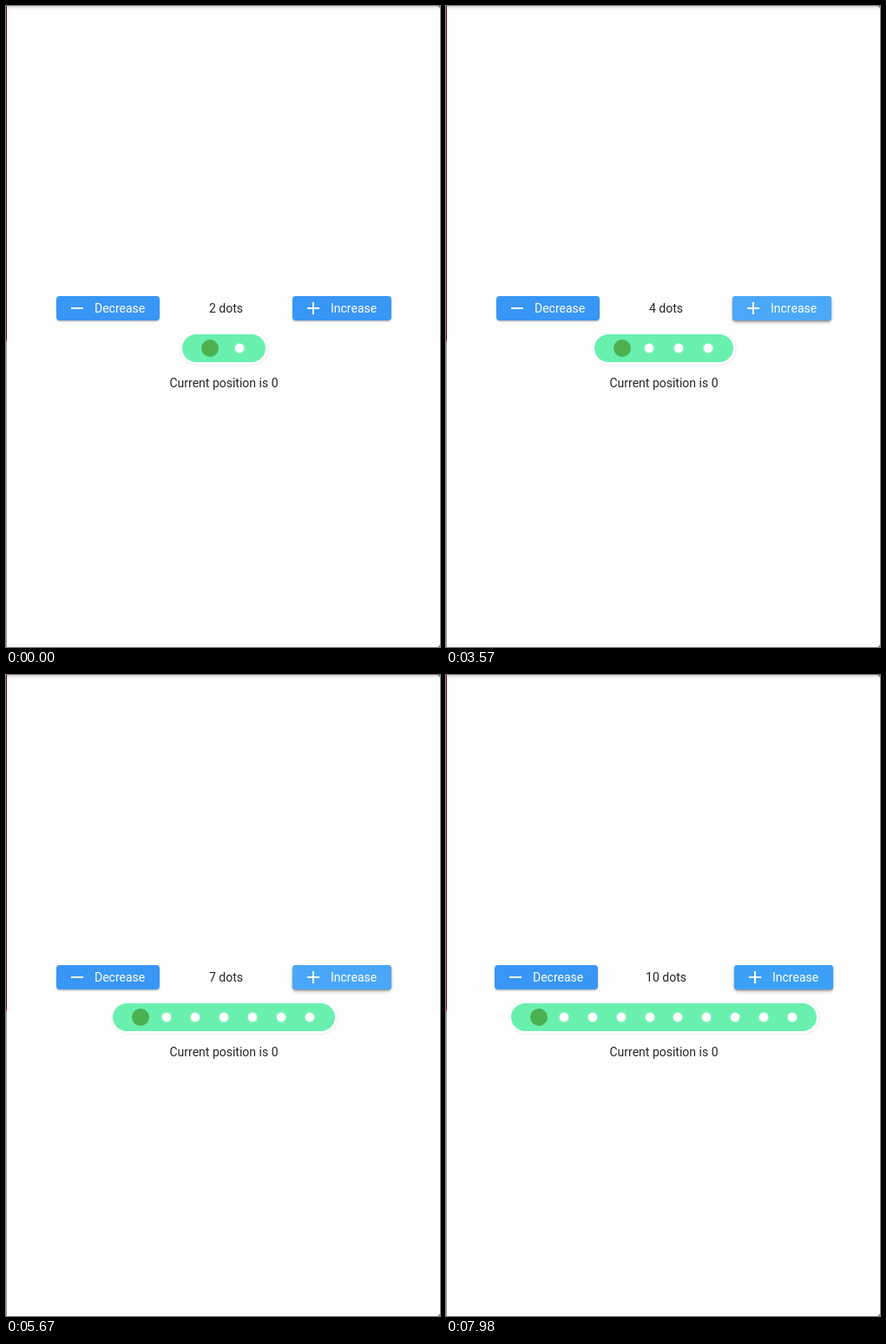
These frames come from a looping animation (500x738 px, 8000 ms). An HTML page:

```html
<!DOCTYPE html>
<html lang="en">
<head>
<meta charset="utf-8">
<title>Dots indicator</title>
<style>
  html, body { margin: 0; width: 100%; height: 100%; overflow: hidden; background: #fefefe; }
  body { position: relative; font: 14px/28px Roboto, sans-serif; color: #262626; }
  div, span, svg { position: absolute; white-space: nowrap; }
  .top { inset: 0 0 auto; height: 5px; background: linear-gradient(#d2d2d2, #efefef 45%, #fefefe); }
  .edge { left: 0; top: 0; width: 1px; height: 100%;
    background: linear-gradient(#66002f 385px, #d8402c 385px 387px, #999 387px); }
  .corner { width: 3px; height: 3px; right: 0; }
  .button { top: 334px; height: 28px; border-radius: 4px; background: #3896f5; color: #fff;
    box-shadow: 0 2px 2px -1px rgba(0,0,0,.2), 0 1px 3px rgba(0,0,0,.16); }
  .button span { left: 44px; }
  .button svg { left: 17px; top: 7px; stroke: #fff; stroke-width: 2; }
  #decrease { width: 119px; }
  #increase { width: 114px; }
  .layer { inset: 0; border-radius: 4px; overflow: hidden; }
  #hover { background: #3ca0f7; box-shadow: 0 2px 3px rgba(0,0,0,.12), 0 3px 4px rgba(0,0,0,.12); }
  #ripple { border-radius: 50%; background: #fff; transform: translate(-50%, -50%); }
  .line { text-align: center; height: 28px; }
  #count { left: 203.5px; top: 334px; width: 100px; }
  #position { left: 151px; top: 420px; width: 200px; }
  #pill { top: 378px; height: 32px; border-radius: 16px; background: #69f0ae;
    box-shadow: 0 0 0 2.5px #fff, 1px 1px 2px 3px rgba(0,0,0,.055); }
  .dot { top: 16px; width: 10px; height: 10px; border-radius: 50%; background: #fff;
    transform: translate(-50%, -50%); box-shadow: 0 0 1.5px .5px rgba(235,250,243,.85); }
  .dot.active { width: 20px; height: 20px; background: #4caf50; box-shadow: none; }
</style>
</head>
<body>
<div class="top"></div>
<div class="edge"></div>
<div class="corner" style="top:0; background:radial-gradient(circle at 0 100%, transparent 2.4px, #666 3.2px)"></div>
<div class="corner" style="bottom:0; background:radial-gradient(circle at 0 0, transparent 2.4px, #666 3.2px)"></div>

<div class="button" id="decrease">
  <svg width="14" height="14"><path d="M0 7H14"/></svg>
  <span>Decrease</span>
</div>
<div class="line" id="count"></div>
<div class="button" id="increase">
  <div class="layer" id="hover"></div>
  <div class="layer"><div id="ripple"></div></div>
  <svg width="14" height="14"><path d="M0 7H14M7 0V14"/></svg>
  <span>Increase</span>
</div>
<div id="pill"></div>
<div class="line" id="position">Current position is 0</div>

<script>
const LOOP = 8000;
const HOVER_START = 2130, HOVER_TIME = 200;
// Times of pointer down and pointer up; each release adds one dot.
const TAPS = [
  [2355, 2445], [3060, 3268], [3900, 4010], [4590, 4705],
  [5265, 5363], [6000, 6110], [6690, 6805], [7495, 7570]
];
const SPREAD_TIME = 225, FADE_TIME = 150;
const RADIUS_FROM = 17.6, RADIUS_TO = 63.7;
const POINTER_X = 48, CENTRE_X = 57;

const el = id => document.getElementById(id);
const clamp = v => Math.min(1, Math.max(0, v));
const mix = (a, b, k) => a + (b - a) * k;

// cubic-bezier(.25, .1, .25, 1)
function ease(x) {
  const bezier = (s, a, b) => 3 * (1 - s) ** 2 * s * a + 3 * (1 - s) * s * s * b + s ** 3;
  let low = 0, high = 1;
  for (let i = 0; i < 20; i++) {
    const mid = (low + high) / 2;
    if (bezier(mid, .25, .25) < x) low = mid; else high = mid;
  }
  return bezier(low, .1, 1);
}

let shown = 0;
function showDots(n) {
  if (n === shown) return;
  shown = n;
  const width = 32 * n + 32, pitch = 32 + 8 / n, lastInset = 28 + 4 / n;
  const pill = el('pill');
  pill.style.width = width + 'px';
  pill.style.left = 251 - width / 2 + 'px';
  pill.innerHTML = Array.from({ length: n }, (_, i) => {
    const x = i ? width - lastInset - (n - 1 - i) * pitch : 32;
    return `<div class="dot${i ? '' : ' active'}" style="left:${x}px"></div>`;
  }).join('');
  el('count').textContent = n + ' dots';
  const shift = n > 9 ? 2 : 0;
  el('decrease').style.left = 58 - shift + 'px';
  el('increase').style.left = 330 + shift + 'px';
}

function showRipple(t) {
  const tap = TAPS.filter(([down]) => down <= t).pop();
  const style = el('ripple').style;
  style.opacity = 0;
  if (!tap) return;
  const [down, up] = tap;
  let progress = (Math.min(t, up) - down) / 1000;
  if (t > up) progress += (t - up) / SPREAD_TIME;
  const k = ease(clamp(progress));
  const fadeIn = clamp((t - down) / 75);
  const fadeOut = clamp((t - up - SPREAD_TIME) / FADE_TIME);
  style.opacity = .16 * fadeIn * (1 - fadeOut);
  style.width = style.height = 2 * mix(RADIUS_FROM, RADIUS_TO, k) + 'px';
  style.left = mix(POINTER_X, CENTRE_X, k) + 'px';
  style.top = '14px';
}

function draw(now) {
  const t = now % LOOP;
  showDots(2 + TAPS.filter(([, up]) => up <= t).length);
  el('hover').style.opacity = clamp((t - HOVER_START) / HOVER_TIME);
  showRipple(t);
}

const start = performance.now();
function tick() {
  draw(performance.now() - start);
  requestAnimationFrame(tick);
}
tick();
</script>
</body>
</html>
```
